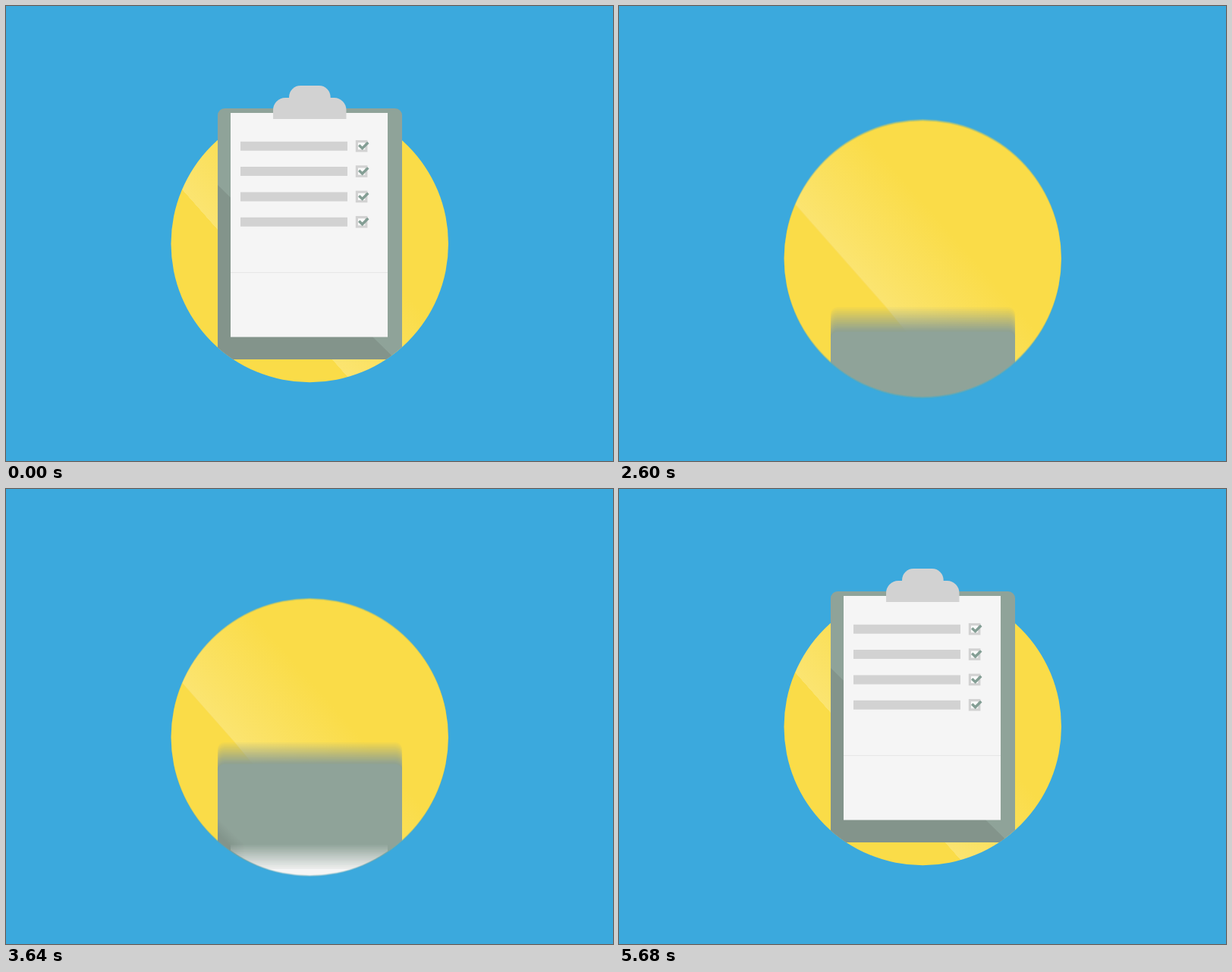
Animation, 800 px wide and 600 px high, one loop 5760 ms. Source, as an HTML page with a canvas:

```html
<!DOCTYPE html>
<html lang="en">
<head>
<meta charset="utf-8">
<title>Checklist</title>
<style>
  html, body { margin: 0; width: 100%; height: 100%; overflow: hidden; background: #3ba9dd; }
  canvas { display: block; }
</style>
</head>
<body>
<canvas id="stage" width="800" height="600"></canvas>
<script>
const LOOP = 5760, STEP = 40, MIRROR = 6200, REST = 5680;
const SHUTTER = 20, SAMPLES = 14;
const CX = 400.25, CY = 313.5, R = 182.75;

const stage = document.getElementById('stage').getContext('2d');
const buffer = document.createElement('canvas');
buffer.width = 800;
buffer.height = 600;
const c = buffer.getContext('2d');

const clamp = x => Math.min(1, Math.max(0, x));
const smooth = x => (x = clamp(x), x * x * (3 - 2 * x));
const easeOut = x => 1 - (1 - clamp(x)) ** 2;

// Rises (or drops) to a peak along a parabola, then settles back to 0.
const overshoot = (t, top, at, curve, back) =>
  t < at ? top + curve * (at - t) ** 2 : top * (1 - smooth((t - at) / back));

function box(color, x, y, w, h, radius = 0) {
  c.fillStyle = color;
  c.beginPath();
  c.roundRect(x, y, w, h, radius);
  c.fill();
}

function drawDisc() {
  const shine = c.createLinearGradient(232, 242, 329.5, 156);
  shine.addColorStop(0, '#fadc48');
  shine.addColorStop(0.002, '#fbe470');
  shine.addColorStop(1, '#fadc48');
  c.fillStyle = shine;
  c.beginPath();
  c.arc(CX, CY, R, 0, 7);
  c.fill();
}

function drawBoard(y) {
  c.save();
  c.translate(0, y);
  box('#8fa399', 279, 135, 243, 331, 9);
  c.clip();
  c.fillStyle = '#83948b';
  c.beginPath();
  c.moveTo(279, 236);
  c.lineTo(513.5, 466);
  c.lineTo(279, 466);
  c.fill();
  c.restore();
}

function drawRow(t, i) {
  const y = 178.7 + i * 33.35, delay = i * 40;
  const peak = 4807 + delay;
  const length = t < peak
    ? 159 * easeOut(1 - (peak - t) / 240)
    : 159 - 18 * smooth((t - peak) / 280);
  if (length > 0) box('#d2d2d2', 309, y, length, 12);

  const size = easeOut((t - 5120 - delay) / 240);
  if (size > 0) {
    c.save();
    c.translate(468.7, y + 6);
    c.scale(size, size);
    box('#d2d2d2', -7.9, -7.8, 15.6, 15.6);
    box('#fafafa', -4.7, -4.6, 9.2, 9.2);
    c.restore();
  }

  const tick = clamp((t - 5320 - delay) / 240);
  if (tick > 0) {
    c.strokeStyle = '#839e94';
    c.lineWidth = 3.4;
    c.setLineDash([17 * tick, 40]);
    c.beginPath();
    c.moveTo(465.2, y + 4.8);
    c.lineTo(469.6, y + 9);
    c.lineTo(477.6, y + 1);
    c.stroke();
    c.setLineDash([]);
  }
}

function drawClip(t) {
  const age = (t - 4480) / STEP;
  c.save();
  c.translate(CX, 127 - 19 * 0.56 ** age);
  c.rotate(-31 * 0.68 ** age * Math.PI / 180);
  box('#d2d2d2', -48.2, -6, 96.4, 28, [16, 16, 0, 0]);
  box('#d2d2d2', -27.2, -22, 54.6, 30, [15, 15, 0, 0]);
  c.restore();
}

function drawScene(t) {
  const discY = 340 * 0.7 ** ((t - 3280) / STEP);
  const boardY = overshoot(t, -24, 3950, 0.002466, 240);
  const paperY = overshoot(t, -50, 4104, 0.00183, 270);
  const seam = 351 + discY;

  c.fillStyle = '#3ba9dd';
  c.fillRect(0, 0, 800, 600);
  c.save();
  c.translate(0, discY);
  drawDisc();
  c.restore();

  // Free above the seam, held inside the disc below it.
  c.save();
  c.beginPath();
  c.rect(0, -100, 800, seam + 100);
  c.moveTo(CX + R, CY + discY);
  c.arc(CX, CY + discY, R, 0, 7);
  c.clip();
  drawBoard(boardY);
  box('#f5f5f5', 296, 141 + paperY, 207, 295.5);
  if (141 + paperY < seam) box('#e6e6e6', 296, seam, 207, 1);
  c.restore();

  for (let i = 0; i < 4; i++) drawRow(t, i);
  if (t > 4380) drawClip(t);
}

let shown = -1;
function frame(now) {
  const time = Math.floor(now % LOOP / STEP) * STEP;
  if (time !== shown) {
    shown = time;
    // The exit is the entrance played backwards.
    const t = time < 3120 ? MIRROR - time : time;
    const count = t >= REST ? 1 : SAMPLES;
    for (let i = 0; i < count; i++) {
      drawScene(count === 1 ? 6200 : t + SHUTTER * ((i + 0.5) / count - 0.5));
      stage.globalAlpha = 1 / (i + 1);
      stage.drawImage(buffer, 0, 0);
    }
  }
  requestAnimationFrame(frame);
}
frame(0);
</script>
</body>
</html>
```
